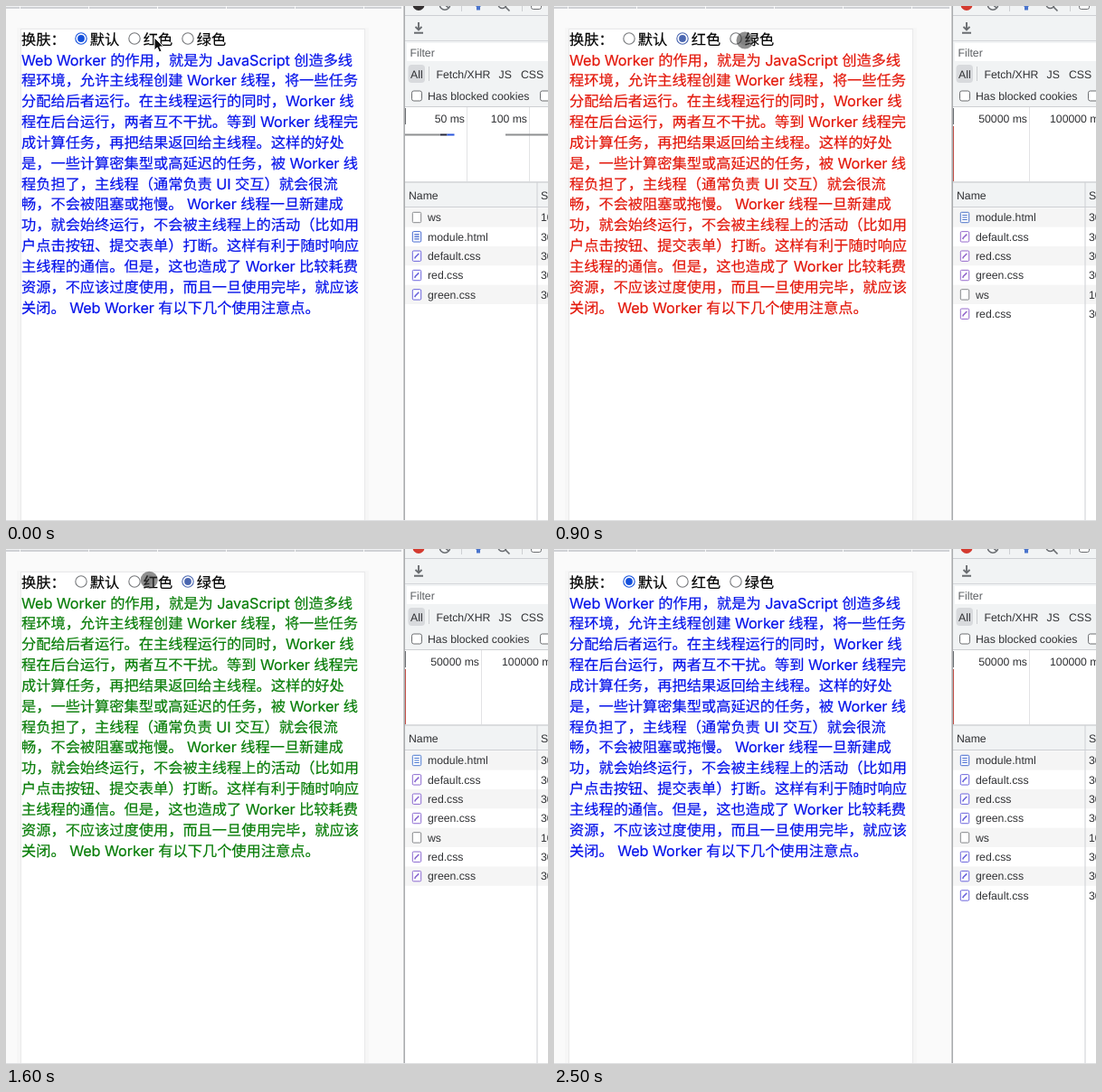
Write an HTML page that moves like this. It is 599x570 px and loops after 2.6 s.

```html
<!DOCTYPE html>
<html lang="zh-CN">
<head>
<meta charset="utf-8">
<title>Theme switch</title>
<style>
html, body { margin: 0; width: 100%; height: 100%; overflow: hidden; background: #fff; }
svg { display: block; width: 599px; height: 570px; }
text { white-space: pre; text-rendering: geometricPrecision; }
.page { font: 16.23px Inter, "Noto Sans CJK SC", "Noto Sans CJK", sans-serif; text-spacing-trim: space-all; stroke-width: .2px; }
.latin { letter-spacing: -.08px; }
.tool { font: 12.25px "Liberation Sans", Arial, sans-serif; fill: #303134; }
.tool.hint { fill: #5b5e62; }
</style>
</head>
<body>
<svg id="stage" viewBox="0 0 599 570" xmlns="http://www.w3.org/2000/svg"></svg>
<script>
const NS = 'http://www.w3.org/2000/svg';
const stage = document.getElementById('stage');
const LOOP = 2600, STEP = 100;

function add(parent, tag, attrs = {}, text) {
  const el = document.createElementNS(NS, tag);
  for (const k in attrs) el.setAttribute(k, attrs[k]);
  if (text !== undefined) el.textContent = text;
  parent.appendChild(el);
  return el;
}
const group = (parent = stage, attrs) => add(parent, 'g', attrs);
const rect = (p, x, y, width, height, fill, more) => add(p, 'rect', { x, y, width, height, fill, ...more });
const path = (p, d, stroke, w = 1, fill = 'none') => add(p, 'path', { d, stroke, 'stroke-width': w, fill });
const circle = (p, cx, cy, r, more) => add(p, 'circle', { cx, cy, r, ...more });
const label = (p, x, y, text, more) => add(p, 'text', { x, y, class: 'tool', ...more }, text);
const show = (el, on) => el.setAttribute('display', on ? 'inline' : 'none');

const THEMES = [
  { text: '#0512ea', radio: '#1551dc', doc: '#4468d0', css: '#6a63dc' },
  { text: '#e3170a', radio: '#4a66b0', doc: '#4a72c8', css: '#9468cc' },
  { text: '#067c06', radio: '#4a66b0', doc: '#4a78d0', css: '#8a68d0' }
];

// Page side
rect(stage, 0, 0, 440, 570, '#fafafa');
rect(stage, 0, 0, 437, 1, '#f1f2f4');
rect(stage, 0, 1, 437, 2, '#cfd1d5');
for (let x = 15; x < 437; x += 76) rect(stage, x, 0, 1, 3, '#fafafa');
rect(stage, 12, 24, 389, 546, '#f6f6f6');
rect(stage, 16.5, 25.5, 380, 545, '#fff', { stroke: '#e9e9ea' });

const article = [
  'Web Worker 的作用，就是为 JavaScript 创造多线',
  '程环境，允许主线程创建 Worker 线程，将一些任务',
  '分配给后者运行。在主线程运行的同时，Worker 线',
  '程在后台运行，两者互不干扰。等到 Worker 线程完',
  '成计算任务，再把结果返回给主线程。这样的好处',
  '是，一些计算密集型或高延迟的任务，被 Worker 线',
  '程负担了，主线程（通常负责 UI 交互）就会很流',
  '畅，不会被阻塞或拖慢。 Worker 线程一旦新建成',
  '功，就会始终运行，不会被主线程上的活动（比如用',
  '户点击按钮、提交表单）打断。这样有利于随时响应',
  '主线程的通信。但是，这也造成了 Worker 比较耗费',
  '资源，不应该过度使用，而且一旦使用完毕，就应该',
  '关闭。 Web Worker 有以下几个使用注意点。'
];
const pageText = group();
article.forEach((line, i) => {
  const row = add(pageText, 'text', { x: 17, y: 65.6 + i * 22.83, class: 'page' });
  for (const part of line.split(/([A-Za-z ]+)/)) {
    if (part) add(row, 'tspan', /[A-Za-z ]/.test(part) ? { class: 'latin' } : {}, part);
  }
});

const caption = (x, text) => add(stage, 'text', { x, y: 42.7, class: 'page', stroke: '#000' }, text);
caption(17, '换肤：');
const radios = ['默认', '红色', '绿色'].map((name, i) => {
  const x = 83 + i * 59;
  caption(x + 9.7, name);
  const ring = circle(stage, x, 36, 6.2, { fill: '#fff', 'stroke-width': 1.1 });
  const dot = circle(stage, x, 36, 3.9);
  return { ring, dot };
});

// Tool panel
const panel = group();
rect(panel, 440, 0, 159, 570, '#fff');
rect(panel, 441, 0, 158, 112, '#f1f3f4');
rect(panel, 441, 10, 158, 1, '#cdcfd3');
rect(panel, 441, 38, 158, 1, '#d5d7da');

const record = circle(panel, 456, -1.5, 6.5);
circle(panel, 485, -1.5, 5.7, { fill: 'none', stroke: '#6a6d71', 'stroke-width': 1.5 });
path(panel, 'M481-5L489 2', '#6a6d71', 1.5);
rect(panel, 503, 0, 1, 6, '#cdcfd3');
path(panel, 'M515-4H529L524 1V4.5H520V1Z', 'none', 0, '#4a74cc');
circle(panel, 548.5, -2, 4.5, { fill: 'none', stroke: '#6a6d71', 'stroke-width': 1.5 });
path(panel, 'M551.5 0.5L556.5 5.5', '#6a6d71', 1.7);
rect(panel, 570, 0, 1, 6, '#cdcfd3');
const box = (x, y) => rect(panel, x, y, 11, 11, '#fff', { rx: 2.2, stroke: '#6c6e71' });
box(580.5, -7.5);
path(panel, 'M456 18V26M452.5 23L456 26.5L459.5 23M451 29.7H461', '#6a6d71', 1.9);

rect(panel, 443, 41, 156, 20, '#fff');
label(panel, 446.5, 56, 'Filter', { class: 'tool hint' });
rect(panel, 444.5, 65, 18.5, 20, '#d8dadd', { rx: 4 });
label(panel, 447, 79.5, 'All');
rect(panel, 467, 67, 1, 16, '#cbcdd0');
label(panel, 475.5, 79.5, 'Fetch/XHR');
label(panel, 544.5, 79.5, 'JS');
label(panel, 569, 79.5, 'CSS');
box(448.5, 94);
label(panel, 466, 104, 'Has blocked cookies');
box(590.5, 94);
rect(panel, 441, 111, 158, 1, '#cdcfd3');

// Timeline before and after the second batch of requests
const early = group(panel);
label(early, 507, 128.5, '50 ms', { 'text-anchor': 'end' });
label(early, 576, 128.5, '100 ms', { 'text-anchor': 'end' });
rect(early, 509, 112, 1, 82, '#e2e3e5');
rect(early, 578, 112, 1, 82, '#e2e3e5');
rect(early, 441, 141.5, 38, 2, '#8e8f91');
rect(early, 479.5, 141.5, 8, 2, '#24263a');
const bar = rect(early, 487.5, 141.5, 8, 2);
rect(early, 552, 141.5, 47, 2, '#8e8f91');
const late = group(panel);
label(late, 523, 128.5, '50000 ms', { 'text-anchor': 'end' });
label(late, 548, 128.5, '100000 ms');
rect(late, 525, 112, 1, 82, '#e2e3e5');
rect(late, 441, 133, 1, 61, '#c4524a');
rect(panel, 441, 113, 1, 18, '#6f7174');

// Request table
rect(panel, 441, 194, 158, 29, '#f1f3f4');
rect(panel, 441, 194.5, 158, 1, '#c4c6ca');
rect(panel, 441, 222, 158, 1, '#cdcfd3');
label(panel, 445, 213.8, 'Name');
label(panel, 591, 213.8, 'Status');

const cssIcons = [], docIcons = [];
function requestRow(parent, name, i) {
  const y = 234 + i * 21.35;
  if (i % 2 === 0) rect(parent, 441, y - 10.7, 158, 21.35, '#f5f5f5');
  const icon = group(parent, { stroke: '#85878a', fill: 'none', transform: `translate(454 ${y})` });
  add(icon, 'rect', { x: -4.7, y: -5.7, width: 9.4, height: 11.4, rx: 1.2, fill: '#fff' });
  if (name.endsWith('html')) {
    add(icon, 'path', { d: 'M-2.7-2.5H2.7M-2.7 0H2.7M-2.7 2.5H2.7', 'stroke-width': 1.2 });
    docIcons.push(icon);
  } else if (name.endsWith('css')) {
    add(icon, 'path', { d: 'M-2.3 2.8L-1.6 1.2L2.3-2.7', 'stroke-width': 1.6 });
    cssIcons.push(icon);
  }
  label(parent, 466, y + 4.2, name);
  label(parent, 591, y + 4.2, name === 'ws' ? '101' : '304');
}
const files = ['module.html', 'default.css', 'red.css', 'green.css'];
const firstList = group(panel);
['ws', ...files].forEach((name, i) => requestRow(firstList, name, i));
const nextRows = [...files, 'ws', 'red.css', 'green.css', 'default.css'].map((name, i) => {
  const g = group(panel);
  requestRow(g, name, i);
  return g;
});
rect(panel, 586.5, 195, 1, 374, '#cdcfd3');
rect(panel, 439.5, 0, 1.3, 570, '#97999c');
rect(stage, 0, 569, 599, 1, '#dedfe1');

// Pointer
const arrow = group();
path(arrow, 'M0 0V14L3.2 11L5.5 16L8 14.9L5.8 10H10Z', '#fff', 1, '#111');
const touch = group();
circle(touch, 0, 0, 9.5, { fill: '#333', 'fill-opacity': .55 });
circle(touch, 0, 0, 5.5, { fill: '#333', 'fill-opacity': .15 });
const pulse = circle(touch, 0, 0, 21.6, { fill: 'none', stroke: '#1a1a1a', 'stroke-width': 1.5 });

const track = [
  [0, 164, 35], [300, 151, 36], [600, 151, 36], [900, 211, 38],
  [1100, 219, 37], [1300, 219, 37], [1900, 97.5, 31.5], [2600, 97.5, 31.5]
];
function pointAt(t) {
  const i = track.findIndex(k => k[0] > t);
  const [t0, x0, y0] = track[i - 1], [t1, x1, y1] = track[i];
  const u = (t - t0) / (t1 - t0), s = u * u * (3 - 2 * u);
  return [x0 + (x1 - x0) * s, y0 + (y1 - y0) * s];
}

function draw(ms) {
  const t = Math.floor((ms % LOOP) / STEP) * STEP;
  const chosen = t < 500 ? 0 : t < 1200 ? 1 : t < 2100 ? 2 : 0;
  const theme = THEMES[chosen];
  pageText.setAttribute('fill', theme.text);
  pageText.setAttribute('stroke', theme.text);
  radios.forEach(({ ring, dot }, i) => {
    ring.setAttribute('stroke', i === chosen ? theme.radio : '#77797c');
    dot.setAttribute('fill', theme.radio);
    show(dot, i === chosen);
  });
  cssIcons.forEach(el => el.setAttribute('stroke', theme.css));
  docIcons.forEach(el => el.setAttribute('stroke', t === 500 ? '#595b60' : theme.doc));
  record.setAttribute('fill', t < 500 ? '#332f30' : '#d43a2f');
  bar.setAttribute('fill', chosen ? '#8e8f91' : '#2a56dc');

  const updated = t >= 600;
  show(early, !updated);
  show(late, updated);
  show(firstList, !updated);
  const count = !updated ? 0 : t < 1200 ? 6 : t < 2100 ? 7 : 8;
  nextRows.forEach((row, i) => show(row, i < count));

  const at = `translate(${pointAt(t)})`;
  arrow.setAttribute('transform', at);
  touch.setAttribute('transform', at);
  show(arrow, t < 200);
  show(touch, t >= 200 && t < 2400);
  show(pulse, t === 400 || t === 1100 || t === 2000);
}

const start = performance.now();
function tick() {
  draw(performance.now() - start);
  requestAnimationFrame(tick);
}
tick();
</script>
</body>
</html>
```
